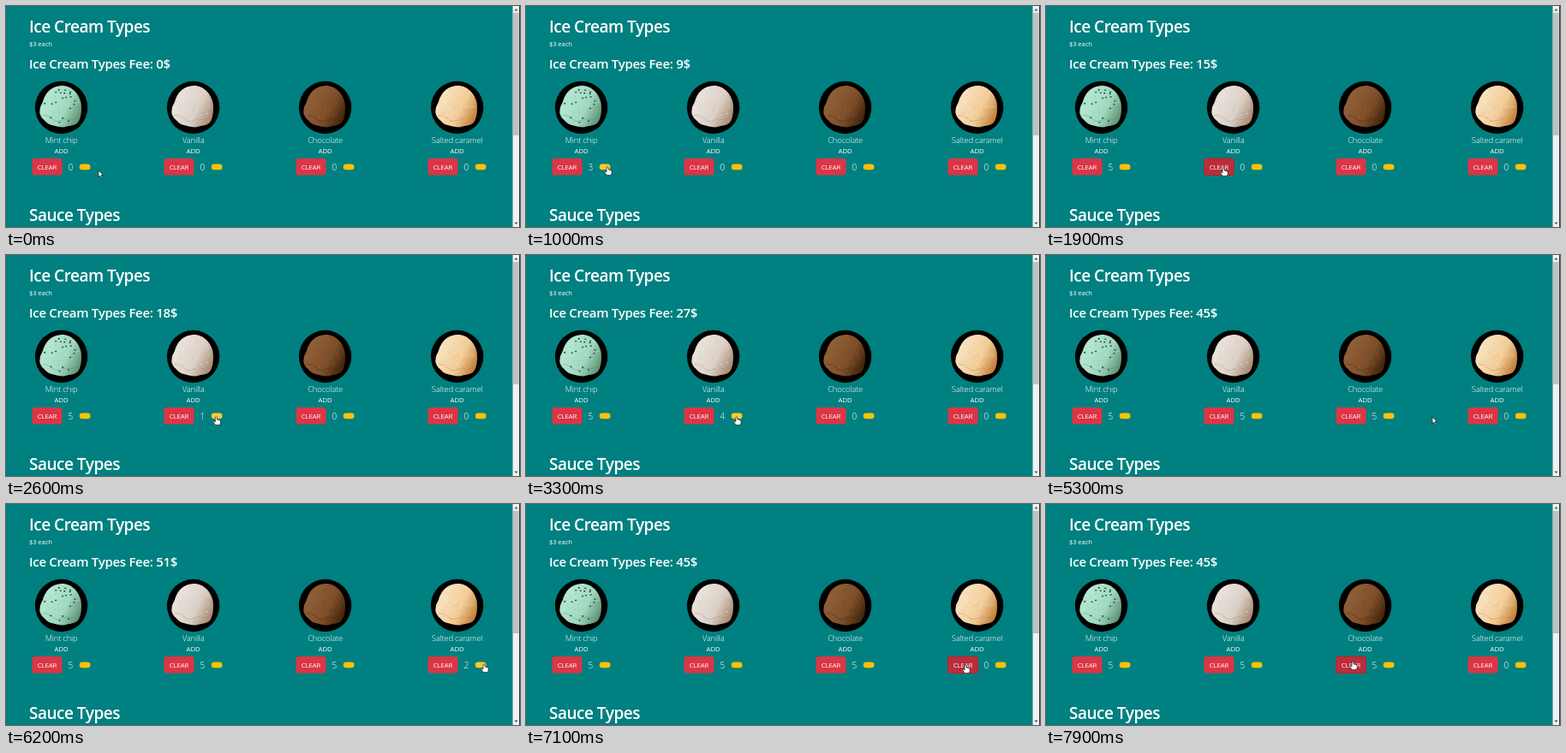
An HTML page for the animation above (8000 ms loop, 600 px wide and 258 px high).

```html
<!DOCTYPE html>
<html lang="en">
<head>
<meta charset="utf-8">
<title>Ice Cream Types</title>
<style>
  html, body { margin: 0; width: 100%; height: 100%; overflow: hidden; background: #008080; }
  svg { display: block; width: 600px; height: 258px; }
  text { font-family: "Open Sans", "Noto Sans", sans-serif; fill: #fff; }
  .h1 { font-size: 19px; font-weight: 600; letter-spacing: -.5px; }
  .h2 { font-size: 15px; font-weight: 600; letter-spacing: -.3px; }
  .small { font-size: 7.6px; letter-spacing: -.1px; }
  .mid { text-anchor: middle; }
  .name { font-size: 9.6px; font-weight: 300; letter-spacing: -.25px; }
  .add { font-size: 7.8px; letter-spacing: -.1px; }
  .count { font-size: 10px; font-weight: 300; }
  .clear rect { fill: #dc3545; }
  .clear.over rect { fill: #bb2d3b; stroke: #a52834; }
  .pill { fill: #ffc107; }
  .pill.over { fill: #ffca2c; }
</style>
</head>
<body>
<svg viewBox="0 0 600 258">
  <defs>
    <path id="ball" d="M-25 3C-25-2-22-4-21-9C-17-20-9-25 0-25.5C12-26 21-16 23-5C24 4 23 13 19 18C14 22 8 21 3 23C-3 23-8 21-13 20C-18 18-19 15-22 13C-24 10-26 7-25 3Z"/>
  </defs>
  <rect width="600" height="258" fill="#008080"/>
  <text class="h1" x="27" y="30.5">Ice Cream Types</text>
  <text class="small" x="27" y="47">$3 each</text>
  <text class="h2" id="fee" x="27" y="73">Ice Cream Types Fee: 0$</text>
  <g id="list"></g>
  <text class="h1" x="27" y="250.5">Sauce Types</text>
  <rect x="591.5" width="7.5" height="258" fill="#f1f1f1"/>
  <rect x="592" y="8" width="6.5" height="143" fill="#c1c1c1"/>
  <rect x="599" width="1" height="258" fill="#2a3b3b"/>
  <path d="M593.5 5.5h4l-2-2.5zM593.5 252.5h4l-2 2.5z" fill="#505050"/>
  <g id="cursor" stroke="#000" fill="#fff" stroke-linejoin="round">
    <path id="arrow" stroke-width=".6" d="M0 0V7.6L1.8 6L3 8.8L4.3 8.2L3.1 5.5H5.4Z"/>
    <path id="hand" stroke-width=".6" d="M0 .4Q1 -.9 2 .4V3.1Q3.1 2.6 3.5 3.5Q4.7 3 5 4Q6.2 3.8 6.2 5V7.2L5.2 9.4H.2L-2.3 6Q-2.8 4.7-1.6 4.8L0 6Z"/>
  </g>
</svg>
<script>
const NS = 'http://www.w3.org/2000/svg';
const LOOP = 8000, STEP = 100, PRICE = 3;
const $ = id => document.getElementById(id);

function add(parent, tag, attrs, text) {
  const el = document.createElementNS(NS, tag);
  for (const k in attrs) el.setAttribute(k, attrs[k]);
  if (text !== undefined) el.textContent = text;
  parent.appendChild(el);
  return el;
}

function random(seed) {
  return () => (seed = seed * 16807 % 2147483647) / 2147483647;
}

const flavours = [
  { name: 'Mint chip', light: '#b2e6d0', base: '#a0d8c0', dark: '#5f9274', chip: '#17342c',
    clicks: [500, 700, 900, 1100, 1300] },
  { name: 'Vanilla', light: '#e8e1da', base: '#dbd0c6', dark: '#a78a72',
    clicks: [2500, 2700, 2900, 3100, 3400] },
  { name: 'Chocolate', light: '#8e5e37', base: '#7d4e29', dark: '#42250c',
    clicks: [4400, 4600, 4800, 4900, 5100] },
  { name: 'Salted caramel', light: '#f8e0bb', base: '#f1cc98', dark: '#c17f38',
    clicks: [6000, 6200, 6300, 6500, 6600], cleared: 7100 }
];

function scoop(g, f, i) {
  const grad = add(g, 'linearGradient', { id: 'tone' + i, x1: .2, y1: .3, x2: 1, y2: .7 });
  [[0, f.light], [.55, f.base], [1, f.dark]].forEach(([offset, color]) =>
    add(grad, 'stop', { offset, 'stop-color': color }));
  add(g, 'circle', { cy: 118.5, r: 30.7, fill: '#000' });
  const s = add(g, 'g', { transform: 'translate(0 118.5)' });
  add(s, 'use', { href: '#ball', fill: `url(#tone${i})` });
  const rnd = random(411 + i * 97);
  const speck = (n, fill, rx, ry, opacity) => {
    for (let k = 0; k < n; k++) {
      const a = rnd() * 6.28, r = Math.sqrt(rnd()) * 20;
      add(s, 'ellipse', { cx: Math.cos(a) * r, cy: Math.sin(a) * r - 2, rx, ry, fill, opacity });
    }
  };
  speck(18, f.light, 1.4, .8, .4);
  speck(16, f.dark, .8, .5, .35);
  if (f.chip) speck(20, f.chip, 1.1, .8, .95);
  add(s, 'path', { d: 'M-22 9Q-16 8-11 13T0 15T10 14T21 9', fill: 'none',
    stroke: f.dark, opacity: .4 });
}

flavours.forEach((f, i) => {
  f.x = 65 + 154 * i;
  const g = add($('list'), 'g', { transform: `translate(${f.x - .4} 0)` });
  scoop(g, f, i);
  add(g, 'text', { class: 'mid name', y: 159.5 }, f.name);
  add(g, 'text', { class: 'mid add', y: 171.5 }, 'ADD');
  f.clear = add(g, 'g', { class: 'clear' });
  add(f.clear, 'rect', { x: -34.1, y: 178, width: 35, height: 19.5, rx: 3 });
  add(f.clear, 'text', { class: 'mid add', x: -16.6, y: 190.5 }, 'CLEAR');
  f.count = add(g, 'text', { class: 'mid count', x: 10.8, y: 191.5 }, 0);
  f.pill = add(g, 'rect', { class: 'pill', x: 21.2, y: 184.4, width: 12.6, height: 6.8, rx: 3 });
});

// time, x, y of the pointer tip
const path = [
  [0, 108, 192], [400, 94, 188], [1400, 94, 188], [1900, 206, 189],
  [2300, 244, 189], [3500, 245, 189], [3900, 391, 190], [4200, 404, 190],
  [4400, 401, 189], [5100, 401, 189], [5300, 451, 189], [5500, 524, 188],
  [5800, 557, 187], [6600, 557, 187], [6800, 535, 188], [7000, 512, 188],
  [7200, 512, 188], [7700, 396, 188], [7900, 357, 184], [8000, 357, 184]
];

function pointer(t) {
  const i = path.findIndex(p => p[0] > t);
  const [t0, x0, y0] = path[i - 1], [t1, x1, y1] = path[i];
  const k = (t - t0) / (t1 - t0);
  return [x0 + (x1 - x0) * k, y0 + (y1 - y0) * k];
}

function put(el, text) {
  if (el.textContent !== text) el.textContent = text;
}

function draw(now) {
  const t = Math.floor(now % LOOP / STEP) * STEP;
  const [x, y] = pointer(t);
  let total = 0, over = false;
  for (const f of flavours) {
    const n = t >= f.cleared ? 0 : f.clicks.filter(c => c <= t).length;
    total += n;
    put(f.count, String(n));
    const dx = x - f.x;
    const onClear = dx > -34 && dx < 0 && y > 178 && y < 197;
    const onPill = dx > 21 && dx < 34 && y > 184 && y < 191.5;
    f.clear.classList.toggle('over', onClear);
    f.pill.classList.toggle('over', onPill);
    over = over || onClear || onPill;
  }
  put($('fee'), `Ice Cream Types Fee: ${total * PRICE}$`);
  $('cursor').setAttribute('transform', `translate(${x} ${y})`);
  $('hand').style.display = over ? '' : 'none';
  $('arrow').style.display = over ? 'none' : '';
  requestAnimationFrame(() => draw(performance.now()));
}
draw(performance.now());
</script>
</body>
</html>
```
